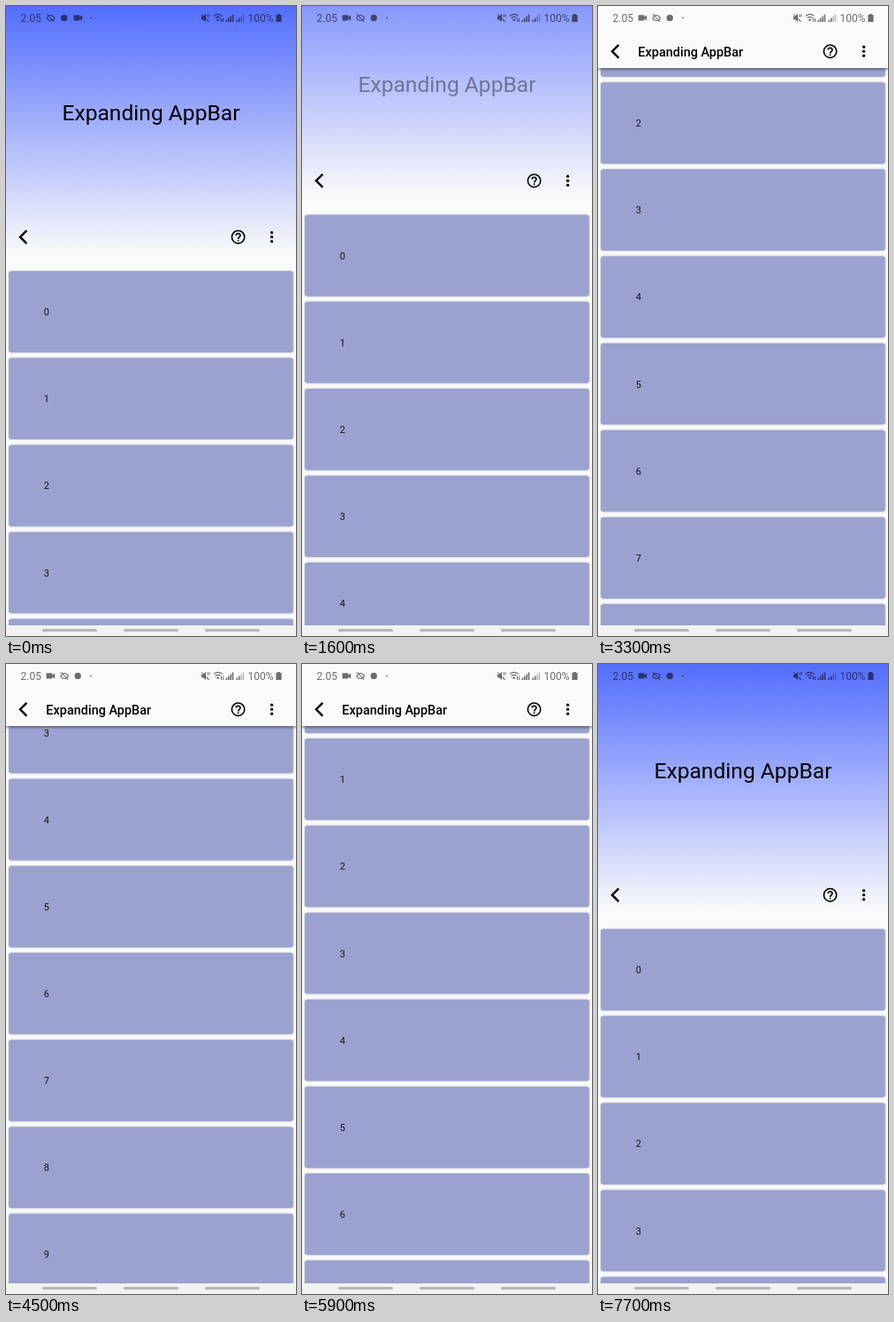
These frames come from a looping animation (328 px wide and 711 px high, 8100 ms). An HTML page:

```html
<!DOCTYPE html>
<html lang="en">
<head>
<meta charset="utf-8">
<title>Expanding AppBar</title>
<style>
  html, body { margin: 0; width: 100%; height: 100%; overflow: hidden; background: #fafafa; }
  svg { display: block; width: 328px; height: 711px; font-family: Roboto, "Noto Sans", sans-serif; }
  .card rect { fill: #9ba2d0; filter: drop-shadow(0 .8px .8px rgba(20, 30, 80, .35)); }
  .card text { font-size: 11px; fill: #111; }
  .status { fill: #000; opacity: .56; }
  .status text { font-size: 12px; }
  .line { fill: none; stroke: #000; }
</style>
</head>
<body>
<svg viewBox="0 0 328 711">
  <defs>
    <linearGradient id="sky" x1="0" y1="0" x2="0" y2="1">
      <stop offset="0" stop-color="#536dfe"/>
      <stop offset="1" stop-color="#fafafa"/>
    </linearGradient>
    <linearGradient id="shade" x1="0" y1="0" x2="0" y2="1">
      <stop offset="0" stop-color="#000" stop-opacity=".36"/>
      <stop offset="1" stop-color="#000" stop-opacity="0"/>
    </linearGradient>
  </defs>
  <rect width="328" height="711" fill="#fafafa"/>
  <g id="list"></g>

  <rect id="shadow" y="70" width="328" height="4" fill="url(#shade)"/>
  <rect id="base" width="328" fill="#fafafa"/>
  <rect id="glow" width="328" fill="url(#sky)"/>
  <text id="bigTitle" x="164" text-anchor="middle" font-size="24.6">Expanding AppBar</text>

  <g id="toolbar">
    <path class="line" stroke-width="2.4" d="M23.4-7.4 16-0 23.4 7.4"/>
    <text id="smallTitle" x="45.3" y="5.4" font-size="14.4" font-weight="500" letter-spacing=".04">Expanding AppBar</text>
    <g transform="translate(262.6 0) scale(.797)">
      <circle class="line" r="9" stroke-width="2"/>
      <path class="line" stroke-width="2" d="M-3-2a3 3 0 0 1 6 0C3 .3 0 .2 0 3"/>
      <path d="M-1 4h2v2h-2z"/>
    </g>
    <g transform="translate(300.6 0)">
      <circle cy="-5" r="1.65"/><circle r="1.65"/><circle cy="5" r="1.65"/>
    </g>
  </g>

  <g class="status">
    <text x="16.5" y="17.8">2.05</text>
    <g id="camera"><path d="M0-3.2h6.6v2L9.6-3v6L6.6 1.2v2H0z"/></g>
    <g id="hidden">
      <path class="line" stroke-width="1.1" d="M.6 .4C2.6-4 7.4-4 9.4 .4 7.4 4 2.6 4 .6 .4M.8-4.4 9 4.4"/>
    </g>
    <g id="badge"><circle cx="4.6" r="3.7"/></g>
    <circle cx="96" cy="13.4" r=".9"/>

    <path d="M221 11.5h2l3-2.8v9.4l-3-2.8h-2z"/>
    <path class="line" stroke-width="1" d="M221 9l9 9M228 9.5v3M230 9v3.5M228 15v2.5"/>
    <path class="line" stroke-width="1.2" d="M234.8 11.4q4.9-4.2 9.8 0M236.6 13.6q3.1-2.6 6.2 0"/>
    <path d="M237.9 15.2q1.8-1.4 3.6 0l-1.8 2.4z"/>
    <path d="M243 14h1v4h-1zM245 14h1v4h-1z"/>
    <g id="bars"></g>
    <text x="273.6" y="17.8">100%</text>
    <path d="M307 9h3v1h1.6v8h-6.2v-8h1.6z"/>
  </g>

  <rect y="699" width="328" height="12" fill="#f2f2f2"/>
  <g fill="#b5b5b5">
    <rect x="41" y="703" width="62" height="3" rx="1.5"/>
    <rect x="133" y="703" width="62" height="3" rx="1.5"/>
    <rect x="225" y="703" width="62" height="3" rx="1.5"/>
  </g>
</svg>
<script>
const LOOP = 8100, STEP = 100;
const PITCH = 98.15, FIRST = 299.2, RANGE = 209.5, BAR = 70;

// [time in ms, scroll offset in px]
const scrollKeys = [
  [0, 0], [1300, 0], [1600, 63.5], [2000, 180], [2250, 235], [2500, 258],
  [3000, 330], [3600, 485], [4200, 555], [4500, 562], [4800, 562],
  [5100, 520], [5500, 410], [5900, 313], [6300, 250], [6700, 222],
  [7000, 150], [7300, 55], [7500, 12], [7700, 0], [LOOP, 0]
];

const $ = id => document.getElementById(id);
const clamp = v => Math.min(1, Math.max(0, v));
const move = (id, x, y) => $(id).setAttribute('transform', `translate(${x} ${y})`);

function make(parent, tag, attrs, text = '') {
  const el = document.createElementNS('http://www.w3.org/2000/svg', tag);
  for (const k in attrs) el.setAttribute(k, attrs[k]);
  el.textContent = text;
  return parent.appendChild(el);
}

for (let i = 0; i < 12; i++) {
  const card = make($('list'), 'g', { class: 'card', transform: `translate(0 ${i * PITCH})` });
  make(card, 'rect', { x: 3.2, width: 321.6, height: 91.7, rx: 3 });
  make(card, 'text', { x: 42.7, y: 49.9 }, i);
}

for (const x of [248.5, 260.5]) {
  for (let i = 0; i < 4; i++) {
    const h = 2.2 + i * 2.1;
    make($('bars'), 'rect', { x: x + i * 2.4, y: 18 - h, width: 1.6, height: h, opacity: x > 260 && i > 1 ? .45 : 1 });
  }
}

const pace = i => {
  const [a, b] = [scrollKeys[i], scrollKeys[i + 1]];
  return a && b ? (b[1] - a[1]) / (b[0] - a[0]) : 0;
};
const slope = i => {
  const a = pace(i - 1), b = pace(i);
  return a * b > 0 ? 2 * a * b / (a + b) : 0;
};

// Monotone cubic through the scroll keys
function scrollAt(t) {
  const i = scrollKeys.findIndex((k, n) => n < scrollKeys.length - 1 && t < scrollKeys[n + 1][0]);
  const [t0, y0] = scrollKeys[i], [t1, y1] = scrollKeys[i + 1];
  const d = t1 - t0, u = (t - t0) / d, v = 1 - u;
  return v * v * (1 + 2 * u) * y0 + u * u * (3 - 2 * u) * y1
    + d * u * v * (v * slope(i) - u * slope(i + 1));
}

function draw(t) {
  const s = scrollAt(t), fold = Math.min(s, RANGE), height = BAR + RANGE - fold;
  move('list', 0, FIRST - s);
  move('toolbar', 0, 260.7 - fold);
  $('base').setAttribute('height', height);
  $('glow').setAttribute('height', height);
  $('glow').setAttribute('opacity', 1 - fold / RANGE);
  $('bigTitle').setAttribute('y', 128.9 - fold / 2);
  $('bigTitle').setAttribute('opacity', clamp(1 - fold / (RANGE / 2)));
  $('smallTitle').setAttribute('opacity', clamp(fold / (RANGE / 2) - 1));
  $('shadow').setAttribute('opacity', s >= RANGE ? 1 : 0);

  const order = t < 500 ? ['hidden', 'badge', 'camera'] : ['camera', 'hidden', 'badge'];
  order.forEach((id, i) => move(id, 45.6 + i * 15.5, 13.4));
}

const start = performance.now();
function tick() {
  const t = (performance.now() - start) % LOOP;
  draw(Math.floor(t / STEP) * STEP);
  requestAnimationFrame(tick);
}
tick();
</script>
</body>
</html>
```
